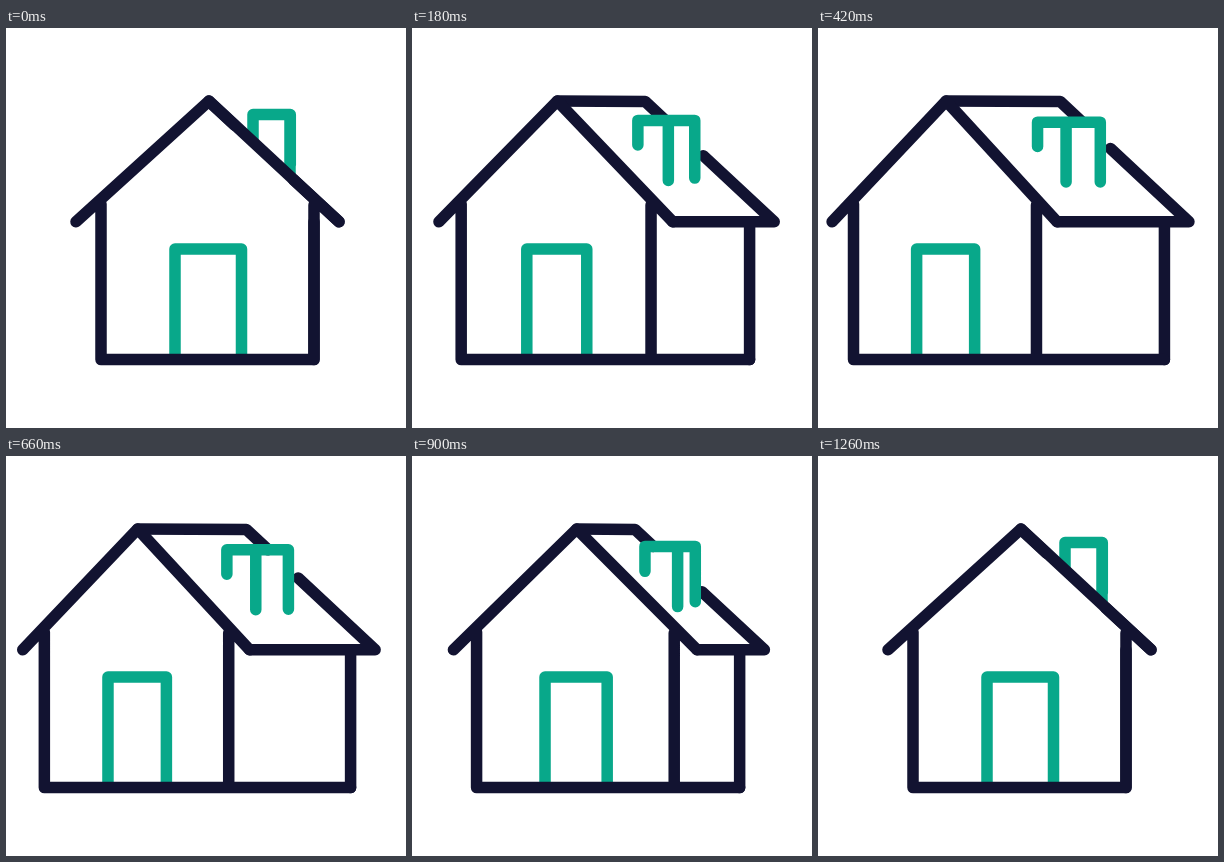
Recreate the animation shown at these times as an HTML page. Size 400 px wide and 400 px high, loop 1.29 s.

```html
<!DOCTYPE html>
<html lang="en">
<head>
<meta charset="utf-8">
<title>House turning</title>
<style>
  html, body { margin: 0; width: 100%; height: 100%; overflow: hidden; background: #fff; }
  svg { display: block; width: 100vw; height: 100vh; }
  path { fill: none; stroke-width: 11.5; stroke-linecap: round; stroke-linejoin: round; }
  .dark { stroke: #121331; }
  .green { stroke: #08a88a; }
  #door { stroke-linecap: butt; }
</style>
</head>
<body>
<svg viewBox="0 0 400 400">
  <path id="back" class="dark"/>
  <path id="chimney" class="green"/>
  <path id="door" class="green"/>
  <path id="front" class="dark"/>
</svg>
<script>
const LOOP = 1290, STEP = 30;
const OPEN_END = 450, CLOSE_END = 1220;
const RIDGE = 73, RIDGE_BACK = 73.5, EAVE = 193.8, FLOOR = 331.6;

const el = id => document.getElementById(id);
const parts = { back: el('back'), chimney: el('chimney'), door: el('door'), front: el('front') };

function bezier(x1, y1, x2, y2) {
  const at = (a, b, s) => 3 * (1 - s) * (1 - s) * s * a + 3 * (1 - s) * s * s * b + s * s * s;
  return x => {
    if (x <= 0) return 0;
    if (x >= 1) return 1;
    let lo = 0, hi = 1;
    for (let i = 0; i < 30; i++) {
      const mid = (lo + hi) / 2;
      if (at(x1, x2, mid) < x) lo = mid; else hi = mid;
    }
    return at(y1, y2, lo);
  };
}

const easeOpen = bezier(0.167, 0.167, 0.17, 1);
const easeClose = bezier(0.833, 0, 0.4, 1);

// 0 = seen from the front, 1 = fully turned
function turnAt(t) {
  return t < OPEN_END
    ? easeOpen(t / OPEN_END)
    : 1 - easeClose((t - OPEN_END) / (CLOSE_END - OPEN_END));
}

const line = (...pts) => 'M' + pts.map(p => p.map(v => v.toFixed(2)).join(' ')).join('L');

function draw(t) {
  const p = turnAt(t);
  const mix = (from, by) => from + by * p;

  const wallL = mix(95, -59.6), wallR = mix(308, -89.7), wallBack = mix(308, 38.5);
  const peak = mix(203, -75), peakBack = mix(203, 39.3);
  const tipL = mix(70, -56), tipR = mix(333, -94), tipBack = mix(333, 38);

  const top = mix(86.5, 7.7);
  const postL = mix(247, -27.5), postM = mix(284, -36), postR = mix(284.3, -2);

  // The far roof edge is broken where the chimney stands
  const onEdge = k => [peakBack + (tipBack - peakBack) * k, RIDGE_BACK + (EAVE - RIDGE_BACK) * k];
  const gapY = Math.max(top, 97 - 13 * p);
  const gapStart = onEdge((gapY - RIDGE_BACK) / (EAVE - RIDGE_BACK));
  const gapEnd = onEdge(mix(0.65, -0.26));

  parts.back.setAttribute('d',
    line([peak, RIDGE], [peakBack, RIDGE_BACK], gapStart) +
    line(gapEnd, [tipBack, EAVE], [tipR, EAVE]) +
    line([wallBack, EAVE], [wallBack, FLOOR]));

  parts.chimney.setAttribute('d',
    line([postL, mix(112, 6.5)], [postL, top], [postR, top], [postR, mix(137, 17)]) +
    line([postM, top], [postM, mix(147, 7)]));

  const doorL = mix(169, -70.5), doorR = mix(235.5, -79);
  parts.door.setAttribute('d',
    line([doorL, FLOOR], [doorL, 221], [doorR, 221], [doorR, FLOOR]));

  parts.front.setAttribute('d',
    line([tipL, EAVE], [peak, RIDGE], [tipR, EAVE]) +
    line([wallL, 176], [wallL, FLOOR], [wallBack, FLOOR]) +
    line([wallR, 177], [wallR, FLOOR]));
}

const start = performance.now();
function tick() {
  const t = (performance.now() - start) % LOOP;
  draw(Math.floor(t / STEP) * STEP);
  requestAnimationFrame(tick);
}
tick();
</script>
</body>
</html>
```
